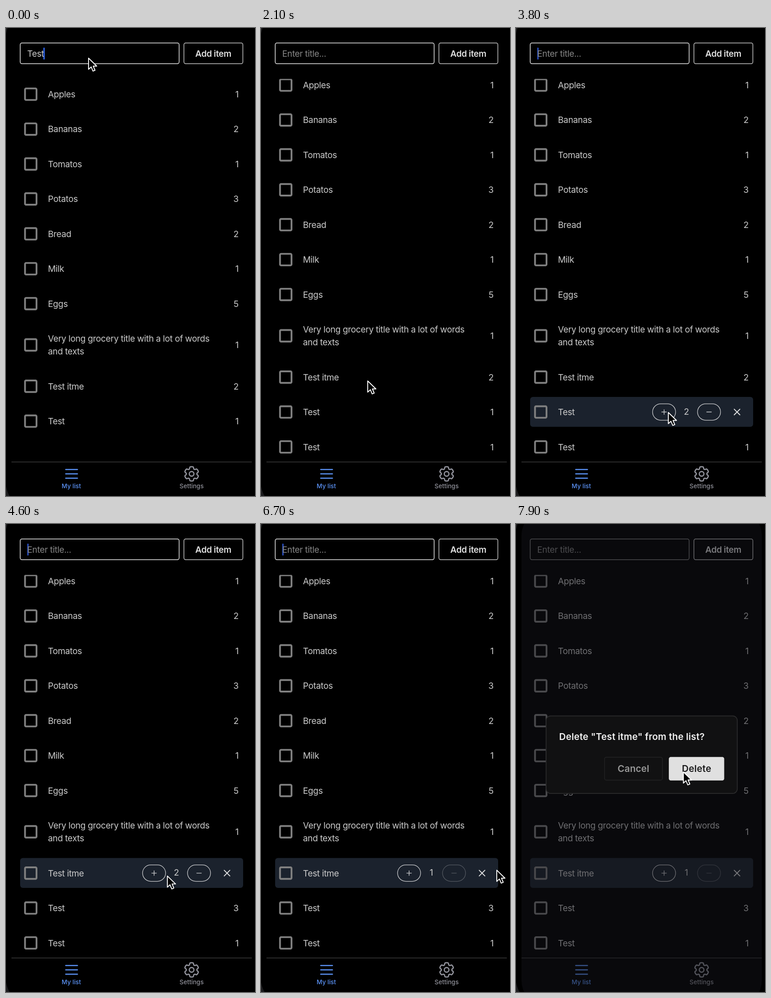
These frames come from a looping animation (546x1025 px, 8000 ms). An HTML page:

```html
<!DOCTYPE html>
<html lang="en">
<head>
<meta charset="utf-8">
<title>Grocery list</title>
<style>
html, body { margin: 0; width: 100%; height: 100%; overflow: hidden; background: #000; }
svg { display: block; width: 546px; height: 1025px; }
text {
  font: 19px Inter, sans-serif; font-optical-sizing: none;
  letter-spacing: -.36px; fill: #cbcbcb; white-space: pre;
}
.bold { font-weight: 600; }
.tab { font-size: 13.5px; font-weight: 500; letter-spacing: 0; }
.modal { font-size: 20.4px; font-weight: 600; letter-spacing: .18px; }
.mid { text-anchor: middle; }
.end { text-anchor: end; }
</style>
</head>
<body>
<svg id="stage" viewBox="0 0 546 1025">
  <defs><clipPath id="view"><rect y="111.5" width="546" height="838.5"/></clipPath></defs>
  <rect width="546" height="1025" fill="#1b1b1d"/>
  <rect x="-1" y="-42" width="620" height="1100" rx="66"/>
  <g id="top"></g>
  <g id="list" clip-path="url(#view)"></g>
  <g id="tabs"></g>
  <g id="modal">
    <rect x="12" y="-30" width="527" height="1085" rx="55" fill="#121218" fill-opacity=".5"/>
    <g id="dialog"></g>
  </g>
  <path id="cursor" d="M1 1V25.5L6.8 20.2L10.7 29.4L15.2 27.5L11.3 18.5H19Z"
    stroke="#fff" stroke-width="1.9" stroke-linejoin="round"/>
</svg>
<script>
const LOOP = 8000, ADD = 1200, DIALOG = 7350, TRAVEL = 500;
const BLUE = '#5b92f5', GREY = '#90919a';
const el = id => document.getElementById(id);
const ramp = (t, from, to) => {
  const p = Math.min(1, Math.max(0, (t - from) / (to - from)));
  return p * p * (3 - 2 * p);
};
const text = (x, y, str, cls = '', fill = '') =>
  `<text x="${x}" y="${y}" class="${cls}"${fill && ` style="fill:${fill}"`}>${str}</text>`;
const box = (x, y, w, h, rx, stroke, width = 1.5, fill = 'none') =>
  `<rect x="${x}" y="${y}" width="${w}" height="${h}" rx="${rx}" fill="${fill}" stroke="${stroke}" stroke-width="${width}"/>`;
const line = (d, stroke, width) =>
  `<path d="${d}" fill="none" stroke="${stroke}" stroke-width="${width}" stroke-linecap="round" stroke-linejoin="round"/>`;

const items = [
  ['Apples', 1], ['Bananas', 2], ['Tomatos', 1], ['Potatos', 3], ['Bread', 2], ['Milk', 1],
  ['Eggs', 5], ['Very long grocery title with a lot of words|and texts', 1],
  ['Test itme', 2], ['Test', 1], ['Test', 1]
];
const EDITED = 9, DELETED = 8, LONG = 7, SCROLL = 20;
const rowY = i => 145 + 76.45 * i + 14 * ((i >= LONG) + (i > LONG));

// Pointer stops: arrival time, x, y
const stops = [
  [0, 180, 65], [800, 420, 46], [1500, 433.5, 86], [1950, 233, 772],
  [2600, 238, rowY(EDITED) - SCROLL], [3250, 333, rowY(EDITED) - SCROLL],
  [4450, 345, 770], [5000, 419, 769], [6500, 517, 757], [7150, 482, 764], [7800, 366, 542]
];

function pointerAt(t) {
  let [, x, y] = stops[0];
  for (const [at, toX, toY] of stops.slice(1)) {
    const p = ramp(t, at - TRAVEL, at);
    x += (toX - x) * p;
    y += (toY - y) * p;
  }
  return [x, y];
}

const selectedAt = t => t < 2700 ? -1 : t < 4550 ? EDITED : DELETED;
const countAt = (t, i) => items[i][1] +
  (i === EDITED ? (t >= 3400) + (t >= 3950) : i === DELETED ? -(t >= 5450) : 0);

function topBar(t) {
  const typed = t < ADD, open = t >= DIALOG;
  const blink = (t < 1000 ? t : t + 600) % 1000 < 500;
  const caret = blink && !open
    ? `<rect x="${typed ? 82 : 46.7}" y="43" width="2.8" height="26" rx="1" fill="${typed ? '#2f68f5' : '#2c55cf'}"/>` : '';
  return box(31.2, 32.7, 348.4, 45.6, 4, open ? '#848484' : '#e8e8e8') +
    box(390.2, 32.7, 129.2, 45.6, 4, '#c4c4c4') +
    text(454.5, 62.5, 'Add item', 'bold mid', '#dedede') + caret +
    (typed ? text(46.5, 62.5, 'Test') : text(46.5, 62.5, 'Enter title...', '', '#858585'));
}

function controls(y, count) {
  const pill = (x, sign, color) =>
    box(x - 25.25, y - 18, 50.5, 36, 18, color, 1.3) + line(`M${x - 5.2} ${y}${sign}`, color, 1.4);
  return pill(324.7, 'h10.4m-5.2 -5.2v10.4', '#cdced0') +
    text(373.5, y + 5.5, count, 'mid') +
    pill(423.3, 'h10.4', count > 1 ? '#cdced0' : '#535860') +
    line(`M478.5 ${y - 6.2}l12.4 12.4m0 -12.4l-12.4 12.4`, '#e4e4e4', 1.9);
}

function row(t, i) {
  const y = rowY(i) - SCROLL * ramp(t, 1350, 1800);
  const lines = items[i][0].split('|'), count = countAt(t, i);
  const on = i === selectedAt(t);
  return (on ? `<rect x="31" y="${y - 33}" width="489" height="65.5" rx="6" fill="#1b222d"/>` : '') +
    box(41.7, y - 12.6, 25.2, 25.2, 2.3, '#808080', 3.9) +
    lines.map((s, n) => text(92, y + 7 + 28 * (n - (lines.length - 1) / 2), s)).join('') +
    (on ? controls(y, count) : text(510, y + 7, count, 'end'));
}

// Six rounded teeth: the radius follows a softened square wave
function gear(cx, cy) {
  const points = Array.from({ length: 120 }, (_, i) => {
    const a = i * Math.PI / 60;
    const r = 13.5 + 2.1 * Math.tanh(2.5 * (Math.cos(6 * a) + .35));
    return `${(cx + r * Math.sin(a)).toFixed(2)} ${(cy - r * Math.cos(a)).toFixed(2)}`;
  });
  return line(`M${points.join('L')}Z`, GREY, 2.7) +
    `<circle cx="${cx}" cy="${cy}" r="5.1" fill="none" stroke="${GREY}" stroke-width="2.7"/>`;
}

el('tabs').innerHTML =
  '<rect x="12" y="950" width="527" height="1" fill="#535353"/>' +
  line('M131 967h25.6m-25.6 9.5h25.6m-25.6 9.5h25.6', BLUE, 2.6) +
  text(143.2, 1008, 'My list', 'tab mid', BLUE) +
  gear(407, 976.5) + text(407, 1008, 'Settings', 'tab mid', GREY);

el('dialog').innerHTML =
  box(66, 420.3, 419.2, 169.8, 10, '#2c2c2d', 1.7, '#111112') +
  text(94.5, 473, 'Delete "Test itme" from the list?', 'modal', '#f1f1f1') +
  box(194.2, 510.7, 126.8, 50.2, 4, '#232324') +
  text(257.6, 543, 'Cancel', 'modal mid', '#989898') +
  box(335.9, 510.9, 119.9, 50, 3.5, '#e0e0e0', 1.5, '#e0e0e0') +
  text(396, 543, 'Delete', 'modal mid', '#1a1a1b');

function frame(now) {
  const t = now % LOOP;
  el('top').innerHTML = topBar(t);
  el('list').innerHTML = items.slice(0, t < ADD ? -1 : undefined).map((_, i) => row(t, i)).join('');
  el('modal').setAttribute('opacity', ramp(t, DIALOG, DIALOG + 200));
  el('dialog').setAttribute('opacity', ramp(t, DIALOG, DIALOG + 300));
  el('cursor').setAttribute('transform', `translate(${pointerAt(t)})`);
  requestAnimationFrame(frame);
}
frame(0);
</script>
</body>
</html>
```
